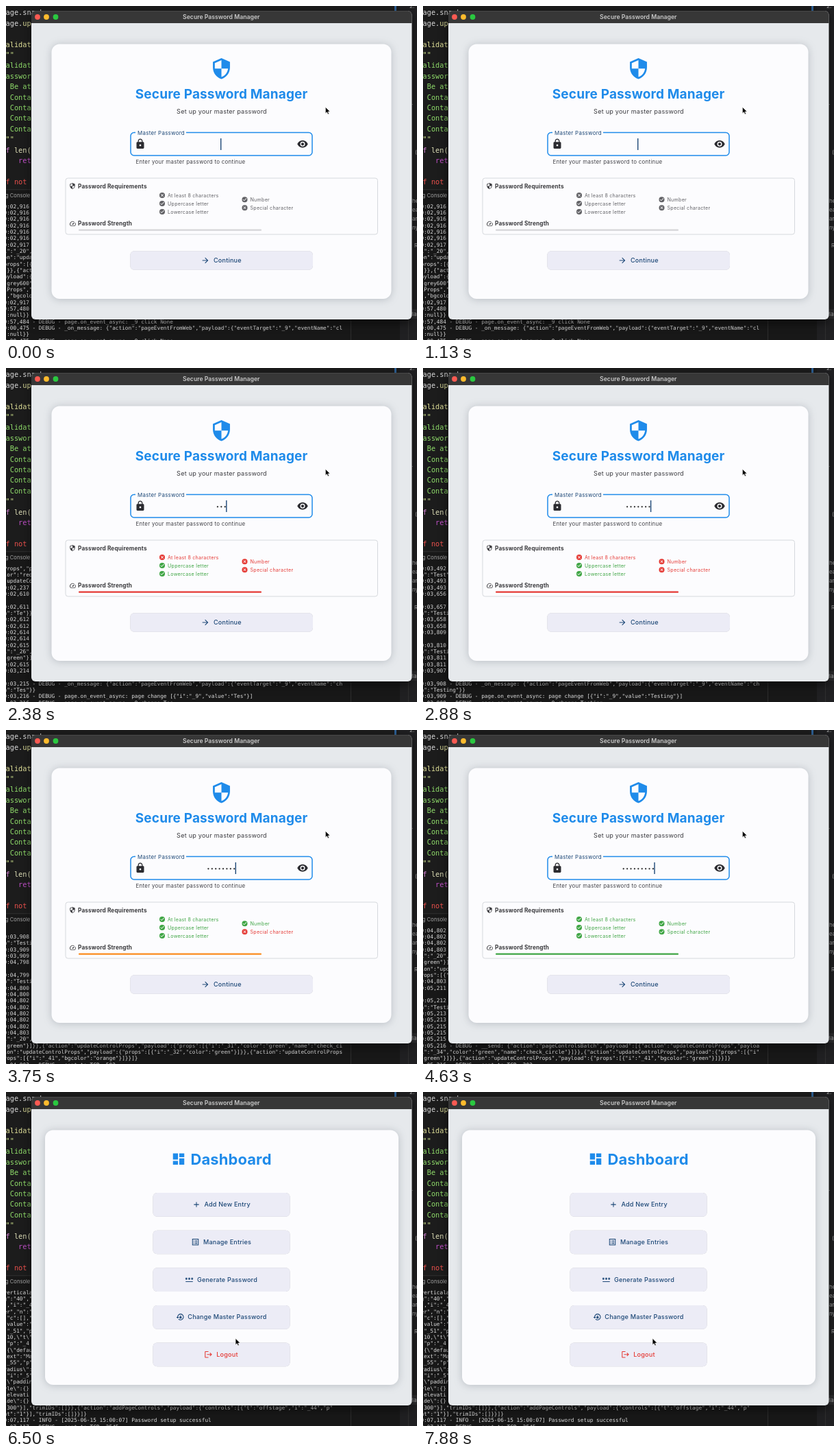
These frames come from a looping animation (600x487 px, 8000 ms). An HTML page:

```html
<!DOCTYPE html>
<html lang="en">
<head>
<meta charset="utf-8">
<title>Secure Password Manager</title>
<style>
html, body { margin: 0; width: 100%; height: 100%; overflow: hidden; background: #1b1b1b; }
svg { display: block; width: 600px; height: 487px; font-family: Inter, "Open Sans", sans-serif; }
.mono text { font-family: "DejaVu Sans Mono", monospace; white-space: pre; }
#code { font-size: 10.3px; }
#log { font-size: 7.75px; fill: #dcdcdc; }
#window { filter: drop-shadow(0 5px 7px rgba(0, 0, 0, .55)); }
.card { fill: #fcfcfe; filter: drop-shadow(0 1px 6px rgba(70, 80, 95, .28)); }
.button { fill: #ececf6; filter: drop-shadow(0 .8px .7px rgba(0, 0, 0, .26)); }
.label { font-size: 9.05px; font-weight: 500; letter-spacing: .2px; fill: #1d4877; }
.bold { font-size: 8.25px; font-weight: 700; letter-spacing: .15px; fill: #3a3a3d; }
.rule { font-size: 7.1px; letter-spacing: .26px; }
.small { font-size: 7.95px; letter-spacing: .27px; }
</style>
</head>
<body>
<svg id="stage" viewBox="0 0 600 487" xmlns="http://www.w3.org/2000/svg"></svg>
<script>
const LOOP = 8000, STEP = 125;
const BLUR = 6000, DASHBOARD = 6125;
const NAVY = '#1d4877', BLUE = '#1f8bea', GREEN = '#3fa544', RED = '#e53a35', GREY = '#626266';

const circle = 'M12 2a10 10 0 1 0 0 20a10 10 0 1 0 0-20z';
const star = x => `M${x} 7v5.9M${x - 2.6} 8.5l5.2 2.95M${x - 2.6} 11.45l5.2-2.95`;
const ICONS = {
  shield: 'M12 1L3 5v6c0 5.55 3.84 10.74 9 12 5.16-1.26 9-6.45 9-12V5zM12 12h7c-.53 4.12-3.28 7.79-7 8.94V12H5V6.3l7-3.11z',
  lock: 'M18 8h-1V6c0-2.76-2.24-5-5-5S7 3.24 7 6v2H6c-1.1 0-2 .9-2 2v10c0 1.1.9 2 2 2h12c1.1 0 2-.9 2-2V10c0-1.1-.9-2-2-2zm-6 9c-1.1 0-2-.9-2-2s.9-2 2-2 2 .9 2 2-.9 2-2 2zm3.1-9H8.9V6c0-1.71 1.39-3.1 3.1-3.1s3.1 1.39 3.1 3.1z',
  eye: 'M12 4.5C7 4.5 2.73 7.61 1 12c1.73 4.39 6 7.5 11 7.5s9.27-3.11 11-7.5c-1.73-4.39-6-7.5-11-7.5zM12 17a5 5 0 1 1 0-10a5 5 0 1 1 0 10zm0-8a3 3 0 1 0 0 6a3 3 0 1 0 0-6z',
  check: circle + 'M10 17l-5-5 1.41-1.41L10 14.17l7.59-7.59L19 8z',
  cancel: circle + 'M17 15.59L15.59 17 12 13.41 8.41 17 7 15.59 10.59 12 7 8.41 8.41 7 12 10.59 15.59 7 17 8.41 13.41 12z',
  gauge: 'M20.38 8.57l-1.23 1.85a8 8 0 0 1-.22 7.58H5.07A8 8 0 0 1 15.58 6.85l1.85-1.23A10 10 0 0 0 3.35 19a2 2 0 0 0 1.72 1h13.85a2 2 0 0 0 1.74-1 10 10 0 0 0-.27-10.44zM10.59 15.41a2 2 0 0 0 2.83 0l5.66-8.49-8.49 5.66a2 2 0 0 0 0 2.83z',
  arrow: 'M12 4l-1.41 1.41L16.17 11H4v2h12.17l-5.58 5.59L12 20l8-8z',
  tiles: 'M3 13h8V3H3zm0 8h8v-6H3zm10 0h8V11h-8zm0-18v6h8V3z',
  plus: 'M19 13h-6v6h-2v-6H5v-2h6V5h2v6h6z',
  list: 'M3 3h18v18H3zM5 5v14h14V5zM11 7h6v2h-6zm0 4h6v2h-6zm0 4h6v2h-6zM7 7h2v2H7zm0 4h2v2H7zm0 4h2v2H7z',
  reset: 'M13 3c-4.97 0-9 4.03-9 9H1l4 4 4-4H6c0-3.86 3.14-7 7-7s7 3.14 7 7-3.14 7-7 7c-1.9 0-3.62-.76-4.88-1.99L6.7 18.42C8.32 20.01 10.55 21 13 21c4.97 0 9-4.03 9-9s-4.03-9-9-9zm2 8v-1c0-1.1-.9-2-2-2s-2 .9-2 2v1c-.55 0-1 .45-1 1v3c0 .55.45 1 1 1h4c.55 0 1-.45 1-1v-3c0-.55-.45-1-1-1zm-1 0h-2v-1a1 1 0 0 1 2 0z',
  exit: 'M17 7l-1.41 1.41L18.17 11H8v2h10.17l-2.58 2.58L17 17l5-5zM4 5h8V3H4c-1.1 0-2 .9-2 2v14c0 1.1.9 2 2 2h8v-2H4z'
};

const rect = (x, y, w, h, fill, more = '') =>
  `<rect x="${x}" y="${y}" width="${w}" height="${h}" fill="${fill}" ${more}/>`;
const text = (x, y, s, more = '') => `<text x="${x}" y="${y}" ${more}>${s}</text>`;
const place = (x, y, size) => `transform="translate(${x - size / 2} ${y - size / 2}) scale(${size / 24})"`;
const icon = (name, x, y, size, fill, more = '') => name === 'stars'
  ? `<path ${place(x, y, size)} d="${star(4) + star(12) + star(20)}M2 18h20" fill="none" stroke="${fill}" stroke-width="2"/>`
  : `<path ${place(x, y, size)} d="${ICONS[name]}" fill="${fill}" fill-rule="evenodd" ${more}/>`;

// Editor behind the window: row number, text, colour
const codeRows = [
  [0, 'age.snack', '#d8d8d8'], [1, 'age.<tspan fill="#dcdc9a">update</tspan>', '#d8d8d8'],
  [3, 'alidate_p', '#e2e29a'], [4, '""', '#c9de8a'], [5, 'alidates', '#8fdc6a'],
  [6, 'assword m', '#8fdc6a'], [7, ' Be at le', '#8fdc6a'], [8, ' Contain', '#8fdc6a'],
  [9, ' Contain', '#8fdc6a'], [10, ' Contain', '#8fdc6a'], [11, ' Contain', '#8fdc6a'],
  [12, '""', '#c9de8a'], [13, '<tspan fill="#d080d0">f </tspan>len(p', '#dfdfb8'],
  [14, '   return', '#c050c8'], [16, 'f not any', '#e8504c']
];

const sideText = [[589, 3, '2.'], [592, 144, '.'], [597, 216, '('], [593, 287, 'he'],
  [593, 300, 'ea'], [593, 313, 'any'], [593, 326, 'ny'], [596, 352, 'R'], [588, 452, 'Pla']];

function desktop() {
  return rect(0, 0, 600, 487, '#1c1c1c') + rect(0, 268, 600, 219, '#181818') +
    rect(0, 267.5, 40, .7, '#3a3a3a') + rect(567, 0, 3, 8, '#2d5f93') + rect(575, 0, 25, 487, '#202022') +
    rect(503, 455, .8, 32, '#343434') + rect(587, 457, .8, 30, '#343434') + rect(588, 442, 12, 14, '#2c2c2e') +
    `<g id="code" class="mono">${codeRows.map(([row, s, c]) =>
      text(-.5, 13.3 + row * 15.4, s, `fill="${c}"`)).join('')}</g>` +
    text(-1, 279, 'g Console', 'font-size="7.6" fill="#a5a5a5"') +
    `<g font-size="8" fill="#a8a8a8">${sideText.map(a => text(...a)).join('')}</g>` +
    `<g id="log" class="mono">${Array.from({ length: 22 }, (_, i) =>
      text(-3.5, (294.8 + i * 9.33).toFixed(2), '')).join('')}</g>`;
}

function frame() {
  const lights = [[46, '#fb5a52'], [59, '#fdbb2d'], [72.5, '#2ac840']];
  return `<g id="window">${rect(37, 7, 555.5, 450, '#e6e9ec', 'rx="6"')}</g>
    <path d="M37 25V13a6 6 0 0 1 6-6h543.500a6 6 0 0 1 6 6v12z" fill="#373737"/>
    <path d="M37.500 13a5.500 5.500 0 0 1 5.500-5.500h543.500a5.500 5.500 0 0 1 5.500 5.500" fill="none" stroke="#555" stroke-width=".6"/>` +
    lights.map(([x, c]) => `<circle cx="${x}" cy="16" r="3.900" fill="${c}"/>`).join('') +
    text(314.3, 19, 'Secure Password Manager',
      'text-anchor="middle" font-size="8.7" font-weight="600" fill="#c9c9c9"');
}

const rules = [
  [228, 276, 'At least 8 characters', v => v.length >= 8],
  [228, 288, 'Uppercase letter', v => /[A-Z]/.test(v)],
  [228, 300, 'Lowercase letter', v => /[a-z]/.test(v)],
  [348.5, 282.3, 'Number', v => /\d/.test(v)],
  [348.5, 294.3, 'Special character', v => /[^\w]/.test(v)]
];

function setup() {
  return `<g id="setup">${rect(66.5, 55.5, 496, 371.5, '', 'rx="12" class="card"')}` +
    icon('shield', 314.5, 91.2, 33.2, BLUE) +
    text(314.6, 134.9, 'Secure Password Manager',
      `text-anchor="middle" font-size="19" font-weight="700" letter-spacing=".15" fill="${BLUE}"`) +
    text(315, 157.3, 'Set up your master password',
      'text-anchor="middle" font-size="9.1" letter-spacing=".22" fill="#3c3c40"') +
    rect(182, 184.6, 265, 33.4, 'none', 'id="field" rx="5" stroke-width="1.5"') +
    rect(189, 183, 74, 4, '#fcfcfe') +
    text(192, 187.5, 'Master Password', `class="small" fill="${NAVY}"`) +
    icon('lock', 196, 201, 16.5, '#2b2b30') + icon('eye', 433, 201.3, 16.8, '#2b2b30') +
    `<g id="dots" fill="#222"></g>` + rect(0, 193, 1.4, 17, NAVY, 'id="caret"') +
    text(189.5, 230.2, 'Enter your master password to continue', 'class="small" fill="#434348"') +
    rect(87, 251, 455.5, 82, 'none', 'rx="3.5" stroke="#d6d9dd"') +
    icon('shield', 97, 262.5, 10, '#434347') + text(105, 265.5, 'Password Requirements', 'class="bold"') +
    rules.map(([x, y, s], i) => `<g id="rule${i}">${icon('check', x, y, 9.7, 'inherit') +
      text(x + 8, y + 2.6, s, 'class="rule"')}</g>`).join('') +
    icon('gauge', 97.5, 317.3, 10.5, '#434347') + text(105, 320.3, 'Password Strength', 'class="bold"') +
    rect(106, 325.6, 267, 2.1, '', 'id="bar" rx="1"') +
    rect(181.3, 357.2, 266.7, 27.6, '', 'id="continue" class="button" rx="6"') +
    icon('arrow', 291, 371, 13, NAVY) + text(303, 374.2, 'Continue', 'class="label"') + '</g>';
}

const menu = [
  ['plus', 278, 289.5, 'Add New Entry'], ['list', 276.5, 288, 'Manage Entries'],
  ['stars', 267.5, 279, 'Generate Password'], ['reset', 254.3, 265.3, 'Change Master Password'],
  ['exit', 295.5, 307.3, 'Logout']
];

function dashboard() {
  return `<g id="dashboard">${rect(57, 55.5, 516, 371.5, '', 'rx="12" class="card"')}` +
    icon('tiles', 252, 97.7, 22, BLUE) +
    text(269.5, 106.1, 'Dashboard', `font-size="21.9" font-weight="700" letter-spacing=".15" fill="${BLUE}"`) +
    menu.map(([name, ix, tx, s], i) => {
      const y = 147 + i * 54.65, red = name === 'exit';
      return rect(214.5, y, 200, 34.7, '', 'rx="6" class="button"') +
        icon(name, ix, y + 17.1, 12.6, red ? RED : NAVY) +
        text(tx, y + 20.2, s, `class="label" ${red ? `style="fill:${RED}"` : ''}`);
    }).join('') + '</g>';
}

const pointer = `<g id="mouse">
  <path id="tip" d="M0 0v9.400l2.200-2 1.400 3.300 1.700-.7-1.400-3.200h3z" fill="#000" stroke="#fff" stroke-width=".7"/>
  <path id="hand" d="M-1 1.200q1-1.700 2 0v3.500q1.500-1 2 .2 1.500-.8 2 .4 1.600-.5 1.500 1.200-.1 3-1.500 5.500h-4.600c-.8-2-2.700-3-3.500-4.800 .5-1 1.400-.6 2.100.3z"
    transform="scale(1.12)" fill="#fff" stroke="#111" stroke-width=".8"/></g>`;

const stage = document.getElementById('stage');
stage.innerHTML = desktop() + frame() + setup() + dashboard() + pointer;
const $ = id => document.getElementById(id);

// Keystrokes: time shown, log clock in ms, field value
const keys = [
  [1250, 2232, 'T'], [1625, 2610, 'Te'], [2250, 3214, 'Tes'], [2500, 3491, 'Test'],
  [2625, 3656, 'Testi'], [2750, 3809, 'Testin'], [2875, 3907, 'Testing'],
  [3750, 4798, 'Testing1'], [4250, 5211, 'Testing1!']
];

function strength(v) {
  const n = rules.filter(r => r[3](v)).length;
  return n === 5 ? 'green' : n === 4 ? 'orange' : 'red';
}

// Console log: lines wrap at 121 columns, the first 15 lie off stage
const rows = [], marks = [];
function put(line) {
  do { rows.push(line.slice(15, 121)); line = line.slice(121); } while (line);
}
const stamp = ms => `2025-06-15 15:00:${(ms / 1000).toFixed(3).padStart(6, '0').replace('.', ',')}`;
const debug = (ms, s) => put(`${stamp(ms)} - DEBUG - ${s}`);
const indent = s => put(' '.repeat(15) + s);

function message(ms, name, data) {
  debug(ms, '_on_message: {"action":"pageEventFromWeb","payload":{"eventTarget":"_9",' +
    `"eventName":"${name}","eventData":${data}}}`);
}
function batch(ms, props, size) {
  props.forEach(() => debug(ms, 'control changed'));
  const list = props.map(p => `{"action":"updateControlProps","payload":{"props":[{${p}}]}}`);
  debug(ms + 1, `__send: {"action":"pageControlsBatch","payload":[${list}]}`);
  debug(ms + 1, `sent to TCP: ${size}`);
}
const ids = [20, 23, 26, 31, 34];
const bar = c => `"i":"_41","bgcolor":"${c}"`;

batch(2916, [...ids.flatMap(n => [n, n + 1]).map(n => `"i":"_${n}","color":"grey600"`), bar('grey300')], 1040);
message(57480, 'click', 'null');
debug(57484, 'page.on_event_async: _9 click None');
message(475, 'click', 'null');
debug(475, 'page.on_event_async: _9 click None');
marks.push([0, rows.length]);

keys.forEach(([at, ms, value], k) => {
  const old = k ? keys[k - 1][2] : null;
  debug(ms, 'page change');
  rows.push('');
  message(ms + 1, 'change', `"${value}"`);
  debug(ms + 2, `page.on_event_async: page change [{"i":"_9","value":"${value}"}]`);
  debug(ms + 2, `page.on_event_async: _9 change ${value}`);
  const props = [];
  rules.forEach(([, , , test], i) => {
    const ok = test(value);
    if (old !== null && ok === test(old)) return;
    const color = ok ? 'green' : 'red';
    props.push(`"i":"_${ids[i]}","color":"${color}","name":"${ok ? 'check_circle' : 'cancel'}"`,
      `"i":"_${ids[i] + 1}","color":"${color}"`);
  });
  if (old === null || strength(value) !== strength(old)) props.push(bar(strength(value)));
  if (props.length) batch(ms + 4, props, props.length * 100 + 2);
  marks.push([at, rows.length]);
});

message(7023, 'change', '"Testing1!"');
message(7024, 'blur', 'null');
debug(7024, 'page.on_event_async: page change');
debug(7025, 'page.on_event_async: _9 blur None');
['Starting password setup', 'Validating password strength', 'Generating salt and derived key'].forEach((s, i) =>
  debug(7025 + Math.min(i, 1), `[2025-06-15 15:00:07] Operation: Set Password - ${s}`));
marks.push([BLUR, rows.length]);

['verticalal', 'g":"40","', '","i":"_4', 'er","n":"', ',"c":[],"', '"value":"', ':"_51","p', ' 10,\\"t\\"', ',"p":"_4', ':{\\"defau',
  'text":"Ma', '"_55","p"', 'radius\\":', ',"i":"_5"', '{\\"paddin', 'yle\\":{}', '"elevati', 'ide\\":{}',
  '"300"}],"trimIDs":[]}},{"action":"addPageControls","payload":{"controls":[{"t":"offstage","i":"_44","p"',
  'at":"1"}],"trimIDs":[]}}]}'].forEach(indent);
put(`${stamp(7117)} - INFO - [2025-06-15 15:00:07] Password setup successful`);
debug(7117, 'sent to TCP: 2545');
marks.push([DASHBOARD, rows.length]);

const last = (list, t) => list.filter(e => e[0] <= t).pop();
const show = (id, on) => $(id).setAttribute('visibility', on ? 'visible' : 'hidden');
const logLines = [...$('log').children];
const ease = p => p * p * (3 - 2 * p);

function draw(t) {
  const end = last(marks, t)[1];
  logLines.forEach((el, i) => { el.textContent = rows[end - 22 + i] || ''; });

  const key = last(keys, t), value = key ? key[2] : '', n = value.length;
  const done = t >= DASHBOARD;
  $('setup').style.display = done ? 'none' : '';
  $('dashboard').style.display = done ? '' : 'none';

  $('dots').innerHTML = Array.from({ length: n }, (_, i) =>
    `<circle cx="${314.3 + (i - (n - 1) / 2) * 5.4}" cy="202.3" r="1.150"/>`).join('');
  $('caret').setAttribute('x', 313 + n * 2.7);
  const idle = t - (key ? key[0] : 0);
  $('caret').style.display = t < BLUR && idle % 1000 < 500 ? '' : 'none';
  $('field').setAttribute('stroke', t < BLUR ? BLUE : '#1f62ab');

  rules.forEach(([, , , test], i) => {
    const ok = n ? test(value) : i > 0 && i < 4;
    const group = $('rule' + i);
    group.setAttribute('fill', n ? (ok ? GREEN : RED) : GREY);
    group.firstChild.setAttribute('d', ICONS[ok ? 'check' : 'cancel']);
  });
  const tones = { red: RED, orange: '#fb8c1e', green: GREEN };
  $('bar').setAttribute('fill', n ? tones[strength(value)] : '#d5d5d8');

  const p = ease(Math.min(1, Math.max(0, (t - 4625) / 625)));
  const hover = p === 1 && !done;
  $('mouse').setAttribute('transform', `translate(${466.3 - 131.3 * p} ${147.3 + 212 * p})`);
  show('tip', !hover);
  show('hand', hover);
  $('continue').style.fill = hover ? '#dce1ec' : '';
}

let shown = -1;
function tick(now) {
  const t = Math.floor((now % LOOP) / STEP) * STEP;
  if (t !== shown) draw(shown = t);
  requestAnimationFrame(tick);
}
draw(0);
requestAnimationFrame(tick);
</script>
</body>
</html>
```
